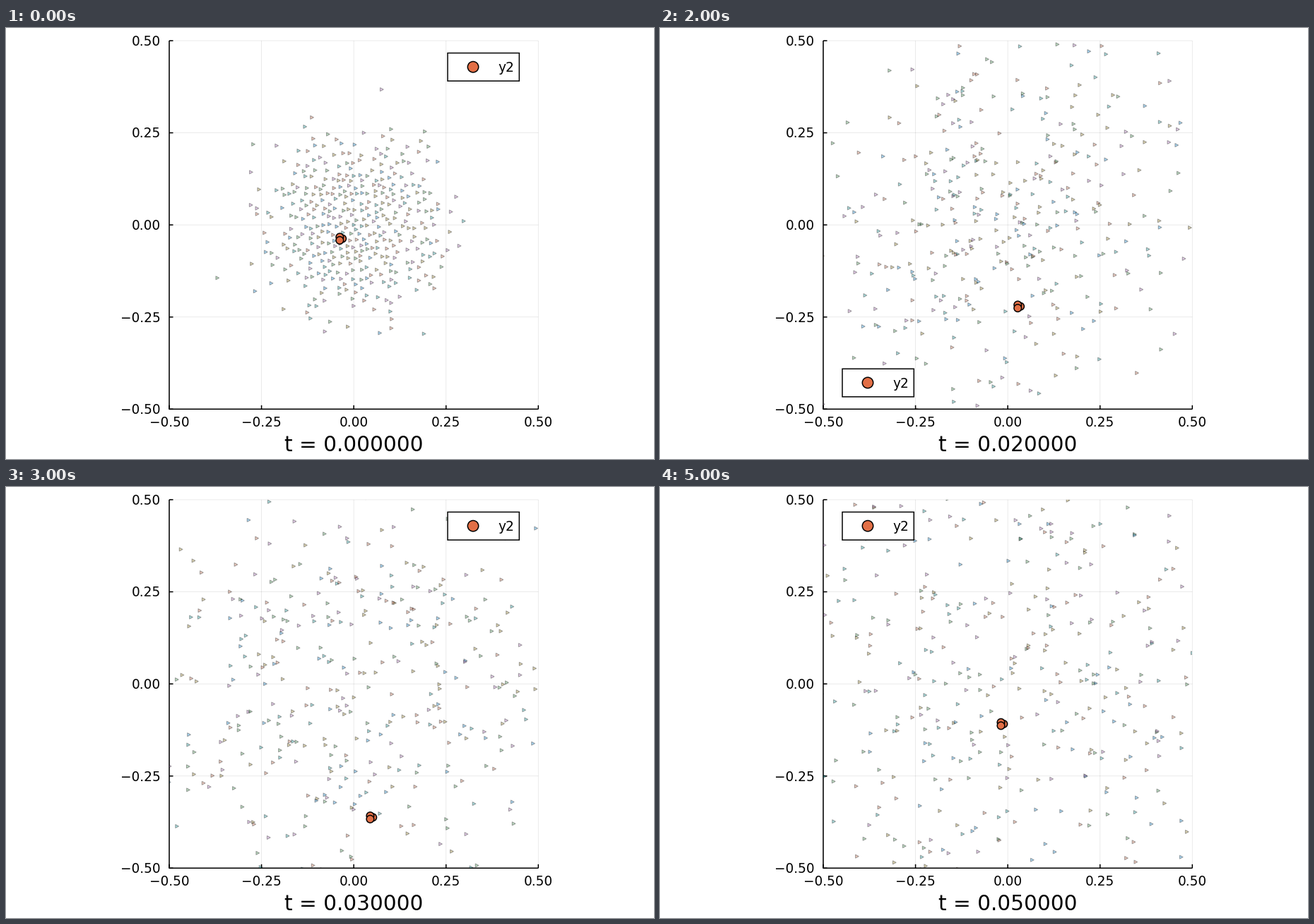
These frames come from a looping animation (917 by 611 pixels, 6000 ms). A matplotlib script:

```python
import numpy as np
import matplotlib.pyplot as plt
from matplotlib.animation import FuncAnimation
from matplotlib.collections import PolyCollection
from matplotlib.colors import to_rgba
from matplotlib.patches import Circle, Rectangle

W, H, DPI = 917, 611, 64
PT = 72 / DPI                                # points per pixel
LEFT, TOP, SIDE = 231, 18, 522.3             # plot box in pixels
RIGHT, BOTTOM = LEFT + SIDE, TOP + SIDE
FRAMES, STEP_MS = 6, 1000
COUNT, SPREAD, GAP = 400, 0.105, 0.0135      # cloud at the start
STEP, PERIOD = 0.155, 1.1                    # walk in a periodic cell
ORANGE = "#e26f46"
TINTS = ["#009afa", "#e26f46", "#3da44e", "#c371d2", "#ac8e18", "#00aaae"]

plt.rcParams["font.family"] = "DejaVu Sans"
rng = np.random.default_rng(12)


def to_px(p):
    """Data coordinates to stage pixels."""
    x, y = np.moveaxis(np.asarray(p, float), -1, 0)
    return np.stack([LEFT + (x + 0.5) * SIDE, BOTTOM - (y + 0.5) * SIDE], -1)


def start_cloud():
    """Gaussian dart throwing with a least distance between points."""
    pts = np.zeros((1, 2))
    while len(pts) < COUNT:
        p = rng.normal(0, SPREAD, 2)
        if np.hypot(*(pts - p).T).min() > GAP:
            pts = np.vstack([pts, p])
    return pts


steps = rng.normal(0, STEP, (FRAMES, COUNT, 2))
steps[0] = start_cloud()
walk = np.cumsum(steps, axis=0)
paths = to_px((walk + PERIOD / 2) % PERIOD - PERIOD / 2)

LEADER = to_px([(-0.038, -0.033), (0.120, -0.044), (0.027, -0.217),
                (0.0445, -0.358), (0.0115, -0.237), (-0.0185, -0.1045)])
TRIO = [(3.8, 2.2), (0, 0), (0, 4.6)]
CORNERS = ["NE", "SW", "SW", "NE", "SE", "NW"]
BOX_W, BOX_H, PAD_X, PAD_Y = 101.3, 39.6, 27, 17.5
TRIANGLE = np.array([(-2, -2.4), (-2, 2.4), (2.6, 0)])

fig = plt.figure(figsize=(W / DPI, H / DPI), dpi=DPI, facecolor="white")
ax = fig.add_axes([0, 0, 1, 1])
ax.set_xlim(0, W)
ax.set_ylim(H, 0)
ax.axis("off")


def line(xs, ys, color="black", width=1.55, **kw):
    ax.plot(xs, ys, color=color, lw=width * PT, snap=False,
            solid_capstyle="butt", **kw)


def label(x, y, text, size=18.5, **kw):
    return ax.text(x, y, text, fontsize=size * PT, va="baseline", **kw)


def dot(radius, z):
    return ax.add_patch(Circle((0, 0), radius, fc=ORANGE, ec="black",
                               lw=1.5 * PT, zorder=z))


for v in np.linspace(-0.5, 0.5, 5):
    x, y = to_px((v, v))
    name = f"{v:.2f}".replace("-", "\u2212")
    line([x, x], [TOP, BOTTOM], (0, 0, 0, 0.1), 0.8, zorder=0)
    line([LEFT, RIGHT], [y, y], (0, 0, 0, 0.1), 0.8, zorder=0)
    line([x, x], [BOTTOM, BOTTOM - 5.5])
    line([LEFT, LEFT + 5.5], [y, y])
    label(x, 564.6, name, ha="center")
    label(219, y + 6.8, name, ha="right")
line([LEFT, LEFT, RIGHT], [TOP, BOTTOM, BOTTOM])
clock = label(492.5, 600, "", 29.5, ha="center")

particles = PolyCollection(
    [TRIANGLE],
    facecolors=[to_rgba(c, 0.3) for c in rng.choice(TINTS, COUNT)],
    edgecolors=[(0, 0, 0, 0.33)], linewidths=1.2 * PT, zorder=3)
ax.add_collection(particles, autolim=False)
particles.set_clip_path(Rectangle((LEFT, TOP), SIDE, SIDE,
                                  transform=ax.transData))

trio = [dot(5.3, 4) for _ in TRIO]
box = ax.add_patch(Rectangle((0, 0), BOX_W, BOX_H, fc="white", ec="black",
                             lw=1.5 * PT, snap=False, zorder=5))
key = dot(7.7, 6)
key_text = label(0, 0, "y2", zorder=6)


def draw(i):
    particles.set_verts(paths[i][:, None, :] + TRIANGLE)
    for c, shift in zip(trio, TRIO):
        c.center = tuple(LEADER[i] + shift)
    bx = LEFT + PAD_X if "W" in CORNERS[i] else RIGHT - PAD_X - BOX_W
    by = TOP + PAD_Y if "N" in CORNERS[i] else BOTTOM - PAD_Y - BOX_H
    box.set_xy((bx, by))
    key.center = (bx + 36, by + 19.7)
    key_text.set_position((bx + 71.4, by + 26.5))
    clock.set_text(f"t = {i * 0.01:.6f}")
    return [particles, *trio, box, key, key_text, clock]


anim = FuncAnimation(fig, draw, frames=FRAMES, interval=STEP_MS,
                     init_func=lambda: draw(0), repeat=True, repeat_delay=0)
plt.show()
```
